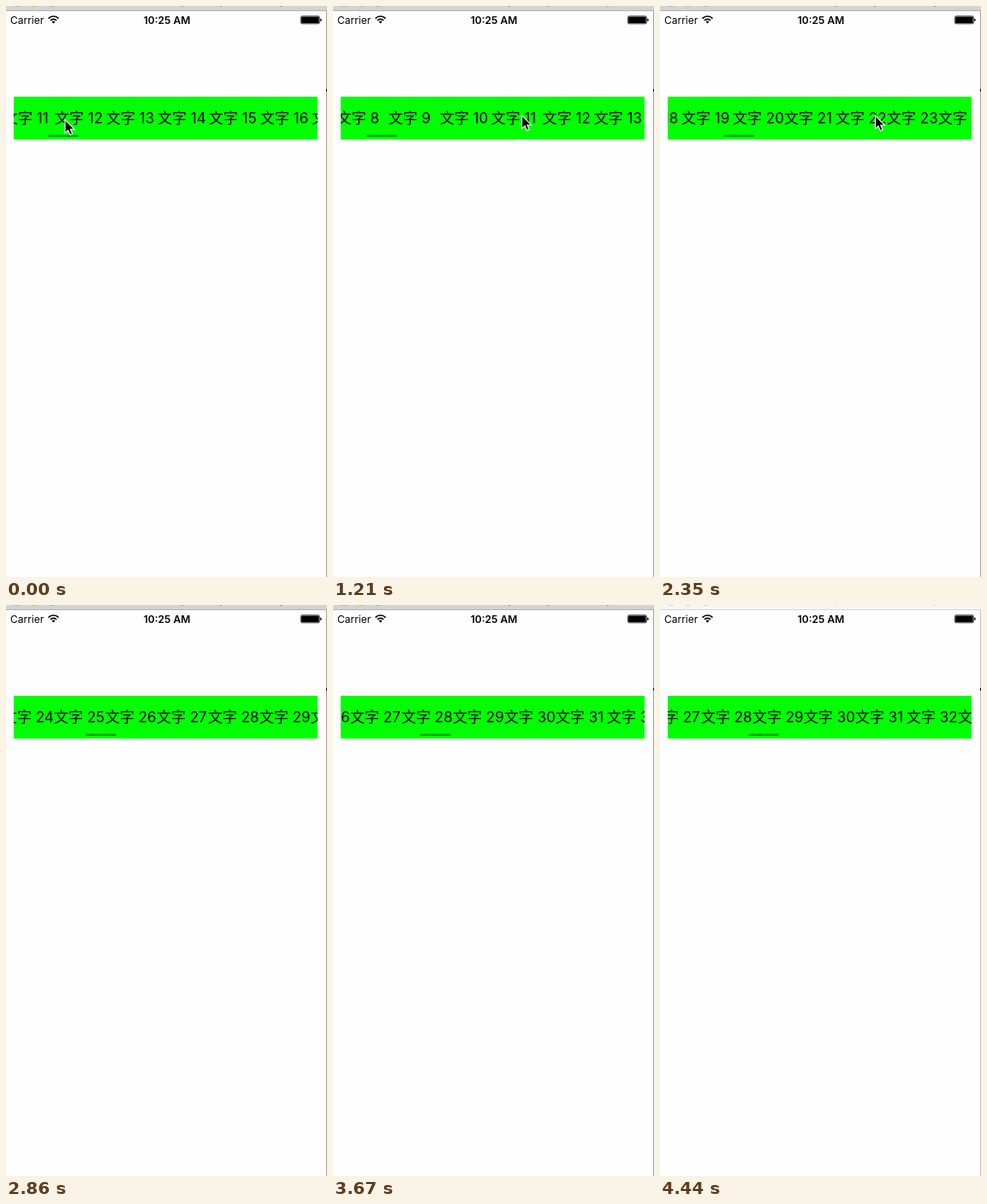
An HTML page that plays this animation: 375x667 px, repeating every 4.54 s.

```html
<!DOCTYPE html>
<html lang="zh-CN">
<head>
<meta charset="utf-8">
<title>Scrolling tabs</title>
<style>
  html, body { margin: 0; width: 100%; height: 100%; overflow: hidden; background: #fefefe; }
  #stage { display: block; width: 375px; height: 667px; --bar: #d3d3d3; --rule: #b1b1b1; --edge: #a0a0a0; --ink: #555; --amber: #f5b93a; --dot: #b4b4b4; }
  #stage.idle { --bar: #f6f6f6; --rule: #d4d4d4; --edge: #bcbcbc; --ink: #b0b0b0; --amber: #d4d4d4; --dot: #d4d4d4; }
  text { font-family: Inter, "Noto Sans CJK SC", "Noto Sans CJK JP", "Noto Sans CJK", sans-serif; }
  .status { font-size: 12px; }
  .tab { font-size: 17px; }
</style>
</head>
<body>
<svg id="stage" viewBox="0 0 375 667">
  <!-- window edge -->
  <rect width="375" height="5" fill="var(--bar)"/>
  <rect y="5" width="375" height="1" fill="var(--rule)"/>
  <rect x="374" y="6" width="1" height="661" fill="var(--edge)"/>
  <rect x="374" y="97" width="1" height="3"/>
  <g fill="var(--dot)">
    <rect x="10" width="6" height="1"/>
    <rect x="30" width="6" height="1" fill="var(--amber)"/>
    <rect x="50" width="6" height="1"/>
  </g>
  <path d="M205 0h2M250 0h2M320 0h2" stroke="var(--ink)"/>

  <!-- status bar -->
  <text class="status" x="5" y="20.5">Carrier</text>
  <text class="status" x="188" y="20.5" text-anchor="middle" font-weight="600">10:25 AM</text>
  <g fill="none" stroke="#000" stroke-width="1.7">
    <path d="M49.6 14.6a8 8 0 0 1 11.8 0M51.9 17a5 5 0 0 1 7.2 0"/>
    <path d="M55.5 20.6l-2-2.1a2.9 2.9 0 0 1 4 0z" fill="#000" stroke="none"/>
  </g>
  <rect x="344.5" y="11.8" width="21.8" height="9" rx="1.6" fill="none" stroke="#000" stroke-opacity=".75"/>
  <rect x="345.2" y="12.5" width="20.4" height="7.6" rx=".6"/>
  <path d="M367.2 14.6q1.5 .4 1.5 1.7t-1.5 1.7z"/>

  <!-- tab strip -->
  <svg x="9" y="106" width="355" height="50" viewBox="9 106 355 50" overflow="hidden">
    <rect x="9" y="106" width="355" height="50" fill="#0f0"/>
    <g id="tabs"></g>
    <rect id="thumb" y="150.5" width="36" height="2.6" rx="1.3" fill="#000" fill-opacity=".36"/>
  </svg>

  <path id="cursor" d="M0 0V15.4l3.5-3.3 2.4 5.5 2.8-1.2-2.4-5.3H11z" stroke="#fff" stroke-width="1.1"/>
</svg>
<script>
const LOOP = 4540, PITCH = 60, COUNT = 41;
// Moments: pull ends, pointer starts to leave, strip is let go, pointer gone, window loses focus
const TURN = 860, RELEASE = 2350, LEAVE = 2380, HIDE = 2800, IDLE = 4440;

const $ = id => document.getElementById(id);
const stage = $('stage'), tabs = $('tabs'), thumb = $('thumb'), cursor = $('cursor');

for (let n = 0; n < COUNT; n++) {
  const label = document.createElementNS('http://www.w3.org/2000/svg', 'text');
  label.setAttribute('class', 'tab');
  label.setAttribute('x', n * PITCH);
  label.setAttribute('y', 137);
  label.textContent = '文字 ' + n;
  tabs.append(label);
}

const progress = (t, from, to) => Math.min(1, Math.max(0, (t - from) / (to - from)));
const smooth = u => u * u * (3 - 2 * u);
const wave = (t, period) => Math.cos(2 * Math.PI * t / period);

// Pull back, speed up over repeated flicks, then coast to rest
function scrollAt(t) {
  if (t < TURN) return 663 - 217 * smooth(t / TURN);
  if (t < RELEASE) return 446 + 668 * progress(t, TURN, RELEASE) ** 2.166;
  return 1641.5 - 527.5 * Math.exp((RELEASE - t) / 520);
}

function cursorAt(t) {
  const x = t < TURN ? 69 + 230 * smooth(t / TURN) : 234.4 + 64.6 * wave(t - TURN, 1235);
  const y = 129.7 + 3.3 * wave(t, 3500) + 185 * progress(t, LEAVE, HIDE) ** 2;
  return [x, y];
}

function draw(t) {
  const s = scrollAt(t);
  tabs.setAttribute('transform', `translate(${-s} 0)`);
  thumb.setAttribute('x', 12.2 + s * 0.0558);
  cursor.setAttribute('transform', `translate(${cursorAt(t)})`);
  cursor.style.display = t < HIDE ? '' : 'none';
  stage.classList.toggle('idle', t >= IDLE);
}

const begin = performance.now();
function tick() {
  draw((performance.now() - begin) % LOOP);
  requestAnimationFrame(tick);
}
tick();
</script>
</body>
</html>
```
